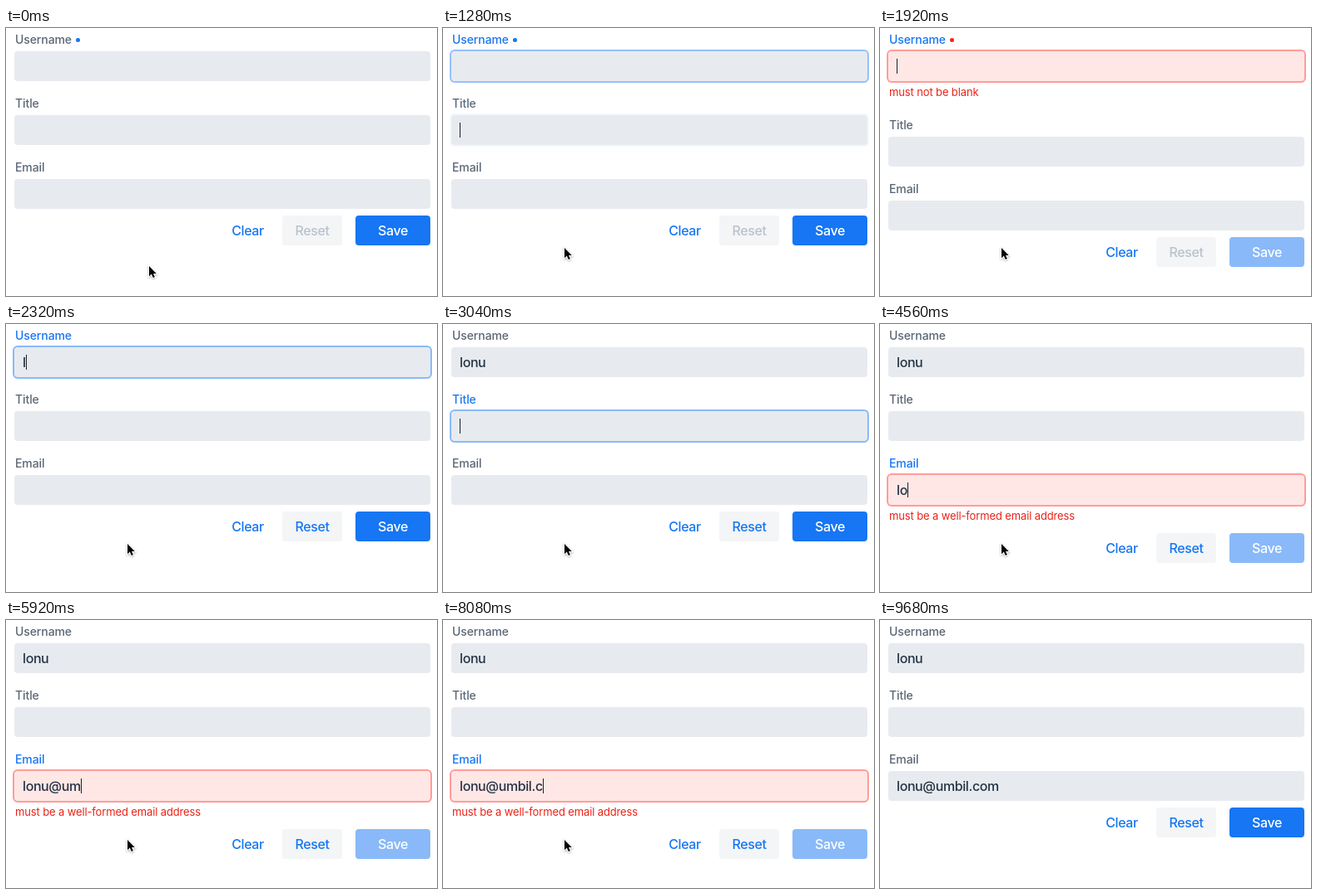
Animation of 518x323 px, one loop 9760 ms. Source, as an HTML page:

```html
<!DOCTYPE html>
<html lang="en">
<head>
<meta charset="utf-8">
<title>Form validation</title>
<style>
  :root { --blue: hsl(214 90% 52%); }
  html, body { margin: 0; width: 518px; height: 323px; overflow: hidden; background: #fff; }
  body { position: relative; font: 500 16px/36px Inter, sans-serif; letter-spacing: -.4px; }

  .field { height: 77px; margin-left: 10px; width: 500px; --tint: 214 90% 52%; }
  .field.invalid { height: 103px; --tint: 3 100% 60%; }
  .label {
    height: 28px; padding-left: 1px; font-size: 14px; line-height: 28px; letter-spacing: -.1px;
    color: color-mix(in srgb, var(--blue) calc(var(--focus) * 100%), hsl(214 42% 18% / .72));
  }
  .dot {
    display: inline-block; width: 5px; height: 5px; margin-left: 5px; border-radius: 50%;
    vertical-align: 2px; background: var(--blue);
  }
  .invalid .dot { background: hsl(3 92% 53%); }
  .input {
    height: 36px; padding-left: 10px; box-sizing: border-box; border-radius: 4px;
    display: flex; align-items: center; background: hsl(214 57% 24% / .1);
    box-shadow: 0 0 0 2px hsl(var(--tint) / calc(var(--ring) * .5));
  }
  .invalid .input { background: hsl(3 100% 60% / .12); }
  .value {
    height: 18px; line-height: 18px; white-space: pre;
    color: hsl(214 40% 16% / .94); border-right: 1px solid transparent;
  }
  .value.caret { border-color: #18202c; }
  .error {
    display: none; padding-left: 1px; line-height: 26px;
    font-size: 13px; font-weight: 400; letter-spacing: -.13px; color: hsl(3 85% 51%);
  }
  .invalid .error { display: block; }

  .buttons { position: relative; margin-top: -5px; }
  .button {
    position: absolute; height: 36px; border-radius: 4px;
    text-align: center; color: var(--blue);
  }
  #clear { left: 261px; width: 59px; }
  #reset { left: 332px; width: 72px; background: hsl(214 61% 25% / .05); }
  #reset.disabled { color: hsl(214 50% 22% / .26); }
  #save {
    left: 420px; width: 90px; color: #fff; background: var(--blue);
    box-shadow: 0 0 0 2px hsl(214 90% 52% / calc(var(--ring) * .5));
  }
  #save.disabled { opacity: .5; }
  #pointer {
    position: absolute; left: 0; top: 0; overflow: visible;
    filter: drop-shadow(0 1px 1px rgb(0 0 0 / .3));
  }
</style>
</head>
<body>
<div class="field">
  <div class="label">Username<span class="dot"></span></div>
  <div class="input"><span class="value"></span></div>
  <div class="error">must not be blank</div>
</div>
<div class="field">
  <div class="label">Title</div>
  <div class="input"><span class="value"></span></div>
</div>
<div class="field">
  <div class="label">Email</div>
  <div class="input"><span class="value"></span></div>
  <div class="error">must be a well-formed email address</div>
</div>
<div class="buttons">
  <div class="button" id="clear">Clear</div>
  <div class="button" id="reset">Reset</div>
  <div class="button" id="save">Save</div>
</div>
<svg id="pointer" width="10" height="16">
  <path d="M0 0V12.2L2.8 9.6L4.8 14L6.9 13.1L5 8.9H8.8Z" stroke="#fff" stroke-width="2" paint-order="stroke"/>
</svg>
<script>
const LOOP = 9760, TICK = 80, BLINK = 500;
const NONE = -1, USERNAME = 0, TITLE = 1, EMAIL = 2, SAVE = 3;

// Each action: time, kind, value. "<" is a backspace.
const actions = [
  [520, 'focus', USERNAME], [1270, 'focus', TITLE], [1340, 'invalid', USERNAME],
  [1750, 'focus', USERNAME],
  [2310, 'key', 'l'], [2310, 'invalid', NONE], [2390, 'key', 'o'], [2470, 'key', 'n'], [2550, 'key', 'u'],
  [2870, 'focus', TITLE], [3270, 'focus', EMAIL], [3670, 'focus', SAVE], [4070, 'focus', EMAIL],
  [4470, 'key', 'l'], [4470, 'invalid', EMAIL], [4550, 'key', 'o'], [4630, 'key', 'n'], [4710, 'key', 'u'],
  [5010, 'key', '@'], [5670, 'key', 'u'], [5910, 'key', 'm'], [5990, 'key', 'b'],
  [6150, 'key', 'i'], [6310, 'key', 'l'],
  [6710, 'key', 'c'], [6870, 'key', 'o'], [7110, 'key', 'm'],
  [7590, 'key', '<'], [7590, 'key', '<'], [7750, 'key', '<'],
  [7910, 'key', '.'], [8070, 'key', 'c'], [8230, 'key', 'o'], [8230, 'invalid', NONE], [8370, 'key', 'm'],
  [9270, 'focus', NONE],
];

const fields = [...document.querySelectorAll('.field')];
const dot = document.querySelector('.dot');
const [reset, save, pointer] = ['reset', 'save', 'pointer'].map(id => document.getElementById(id));

const clamp = x => Math.min(1, Math.max(0, x));
const mix = (a, b, p) => a + (b - a) * p;
const smooth = x => { const p = clamp(x); return p * p * (3 - 2 * p); };

function stateAt(t) {
  const s = { focus: NONE, previous: NONE, focusTime: 0, inputTime: 0, invalid: NONE, values: ['', '', ''] };
  for (const [time, kind, value] of actions) {
    if (time > t) break;
    if (kind === 'invalid') { s.invalid = value; continue; }
    s.inputTime = time;
    if (kind === 'focus') {
      s.previous = s.focus;
      s.focus = value;
      s.focusTime = time;
    } else {
      const text = s.values[s.focus];
      s.values[s.focus] = value === '<' ? text.slice(0, -1) : text + value;
    }
  }
  return s;
}

function pointerAt(t) {
  const arrive = smooth(t / 420), leave = clamp((t - 8880) / 800) ** 2;
  return [mix(mix(172, 146, arrive), 154, leave), mix(mix(287, 265, arrive), 328, leave)];
}

function render(t) {
  const s = stateAt(t);
  const fade = (target, duration) => {
    const p = clamp((t - s.focusTime) / duration);
    return target === s.focus ? p : target === s.previous ? 1 - p : 0;
  };
  const caretOn = (t - s.inputTime) % (2 * BLINK) < BLINK;

  fields.forEach((field, i) => {
    field.classList.toggle('invalid', s.invalid === i);
    field.style.setProperty('--focus', fade(i, 150));
    field.style.setProperty('--ring', fade(i, 100));
    const value = field.querySelector('.value');
    value.textContent = s.values[i];
    value.classList.toggle('caret', s.focus === i && caretOn);
  });
  dot.hidden = s.values[USERNAME] !== '';
  dot.style.display = dot.hidden ? 'none' : '';
  reset.classList.toggle('disabled', s.values[USERNAME] === '');
  save.classList.toggle('disabled', s.invalid !== NONE);
  save.style.setProperty('--ring', fade(SAVE, 100));
  const [x, y] = pointerAt(t);
  pointer.style.transform = `translate(${x}px, ${y}px)`;
}

const start = performance.now();
function frame() {
  const t = (performance.now() - start) % LOOP;
  render(Math.floor(t / TICK) * TICK);
  requestAnimationFrame(frame);
}
frame();
</script>
</body>
</html>
```
